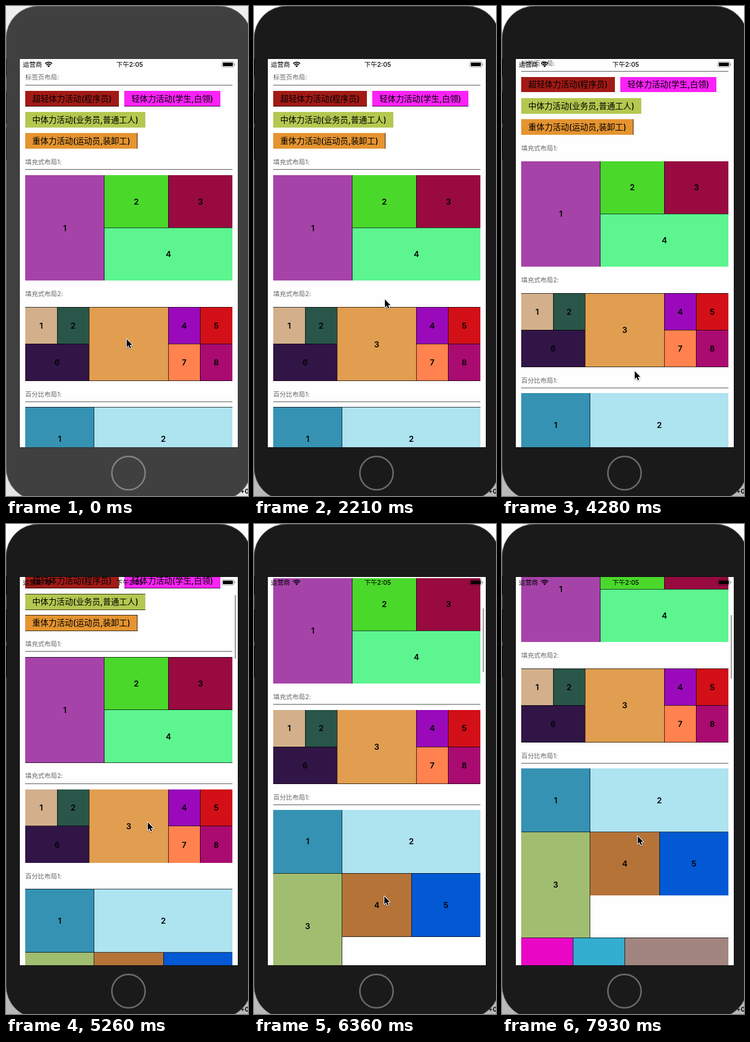
Animation, 403 px wide and 814 px high, one loop 8000 ms. Source, as an HTML page with a canvas:

```html
<!DOCTYPE html>
<html lang="zh-CN">
<head>
<meta charset="utf-8">
<style>
html, body { margin: 0; width: 100%; height: 100%; overflow: hidden; background: #eee; }
canvas { display: block; width: 403px; height: 814px; }
</style>
</head>
<body>
<canvas id="stage" width="403" height="814"></canvas>
<script>
const g = document.getElementById('stage').getContext('2d');
const LOOP = 8000;
const FONT = 'Inter, "Noto Sans CJK SC", "Noto Sans CJK", sans-serif';

const STEPS = [0, 600, 750, 1500, 2210, 2390, 2570, 2750, 2940, 3120, 3330, 3480, 3640, 3800,
  3960, 4120, 4280, 4430, 4600, 4760, 4930, 5100, 5260, 5440, 5620, 5800, 5980, 6160, 6360,
  6530, 6740, 6900, 7070, 7370, 7550, 7740, 7930];

// time, scroll offset, pointer x, pointer y
const KEYS = [
  [0, 0, 200, 552], [500, 0, 200, 552], [750, 0, 215, 486], [1500, 0, 217, 486],
  [2210, 0, 217, 486], [2750, 0, 219, 465], [3120, 14.6, 223, 440], [3330, 17.28, 223, 437],
  [3640, 22, 223, 445], [3960, 23.15, 221, 550], [4280, 23.15, 220, 605],
  [4600, 23.15, 223, 594], [4930, 25, 230, 535], [5260, 59.62, 235, 494],
  [5440, 95, 236, 462], [5620, 130, 234, 446], [5980, 174, 225, 530], [6360, 191.38, 216, 617],
  [6530, 194.4, 216, 617], [7070, 197, 219, 600], [7370, 200, 221, 580],
  [7550, 212, 222, 564], [7740, 244, 224, 534], [7930, 260.1, 225, 517]
];

const LABELS = [
  ['标签页布局:', 118, 131.25], ['填充式布局1:', 259, 271.05],
  ['填充式布局2:', 478, 490.8], ['百分比布局1:', 645, 657.45]
];

const L = 31.9, R = 377.2;
// left, top, right, bottom, colour, text
const TILES = [
  [L, 140.8, 188.2, 166.55, '#a21a15', '超轻体力活动(程序员)'],
  [196.9, 140.8, 357.2, 166.55, '#fa22f6', '轻体力活动(学生,白领)'],
  [L, 175.8, 232.2, 202.3, '#b4c850', '中体力活动(业务员,普通工人)'],
  [L, 210.8, 218.8, 237.3, '#e59430', '重体力活动(运动员,装卸工)'],

  [L, 280.9, 163.6, 456.4, '#a643a9', '1'],
  [163.6, 280.9, 270.2, 368.4, '#4ad92b', '2'],
  [270.2, 280.9, R, 368.4, '#980a40', '3'],
  [163.6, 368.4, R, 456.4, '#5cf58f', '4'],

  [L, 500.2, 85.2, 561.4, '#d3b08b', '1'],
  [85.2, 500.2, 138.3, 561.4, '#295649', '2'],
  [138.3, 500.2, 270.2, 622.95, '#e19e50', '3'],
  [270.2, 500.2, 323.2, 561.4, '#9a0abb', '4'],
  [323.2, 500.2, R, 561.4, '#d30f17', '5'],
  [L, 561.4, 138.3, 622.95, '#311546', '6'],
  [270.2, 561.4, 323.2, 622.95, '#ff824f', '7'],
  [323.2, 561.4, R, 622.95, '#a90b70', '8'],

  [L, 666.05, 146.6, 771.6, '#3592b3', '1'],
  [146.6, 666.05, R, 771.6, '#aee3f0', '2'],
  [L, 771.6, 146.6, 947.3, '#a1bd70', '3'],
  [146.6, 771.6, 262.2, 877.2, '#b57338', '4'],
  [262.2, 771.6, R, 877.2, '#0259d3', '5'],
  [L, 947.3, 118.2, 1053, '#e907c5', '6'],
  [118.2, 947.3, 204.4, 1053, '#33aed0', '7'],
  [204.4, 947.3, R, 1053, '#a38580', '8']
];

const round = Math.round;

function rect(x, y, w, h, color) {
  g.fillStyle = color;
  g.fillRect(x, y, w, h);
}

function text(s, x, y, size, color, weight = 400, align = 'left') {
  g.font = `${weight} ${size}px ${FONT}`;
  g.textAlign = align;
  g.fillStyle = color;
  g.fillText(s, x, y + size * 0.365);
}

// Half-pixel lines survive downscaling only at some positions
const shown = v => v - Math.floor(v) < 0.5;
function hairH(x, y, w, color) {
  if (shown(y)) rect(x, Math.floor(y), w, 1, color);
}
function hairV(x, y, h, color) {
  if (shown(x)) rect(Math.floor(x), y, 1, h, color);
}

function tile([x0, y0, x1, y1, color, label], off) {
  y0 -= off;
  y1 -= off;
  const x = round(x0), y = round(y0), w = round(x1) - x, h = round(y1) - y;
  const edge = 'rgba(0,0,0,.72)';
  rect(x, y, w, h, color);
  hairH(x, y0, w, edge);
  hairH(x, y1 - 0.5, w, edge);
  hairV(x0, y, h, edge);
  hairV(x1 - 0.5, y, h, edge);
  const weight = label.length > 1 ? 500 : 600;
  text(label, (x0 + x1) / 2, (y0 + y1) / 2, 13.55, '#000', weight, 'center');
}

function phone(active) {
  const back = g.createLinearGradient(0, 0, 0, 814);
  back.addColorStop(0, active ? '#fff' : '#eee');
  back.addColorStop(1, active ? '#b8b8b8' : '#e4e4e4');
  rect(0, 0, 403, 814, back);
  text('+0', 390, 806, 11, '#111', 700);

  g.beginPath();
  g.roundRect(0, 0, 409, 821, 54);
  g.fillStyle = active ? '#1a1a1a' : '#404040';
  g.fill();
  g.strokeStyle = active ? '#777' : '#8a8a8a';
  g.lineWidth = 1;
  g.stroke();
  for (const [y, h] of [[87, 30], [142, 53], [202, 53]])
    rect(0, y, 1.5, h, active ? '#0c0c0c' : '#2c2c2c');

  g.beginPath();
  g.arc(204, 776, 27.7, 0, 7);
  g.strokeStyle = active ? '#6b6b6b' : '#828282';
  g.lineWidth = 2.5;
  g.stroke();
  rect(22, 87, 365, 647, active ? '#111' : '#333');
  rect(23, 88, 363, 645, '#fefefe');
}

function statusBar() {
  text('运营商', 28, 97, 10.65, '#000');
  text('下午2:05', 206, 97, 10.65, '#000', 500, 'center');
  g.strokeStyle = g.fillStyle = '#000';
  g.lineWidth = 1.7;
  for (const r of [8.2, 5.2]) {
    g.beginPath();
    g.arc(71, 101.5, r, -Math.PI * 0.75, -Math.PI * 0.25);
    g.stroke();
  }
  g.beginPath();
  g.moveTo(71, 101.8);
  g.arc(71, 101.8, 3.2, -Math.PI * 0.75, -Math.PI * 0.25);
  g.fill();

  g.lineWidth = 0.8;
  g.strokeStyle = 'rgba(0,0,0,.45)';
  g.beginPath();
  g.roundRect(359.4, 92.4, 20, 9.2, 2.3);
  g.stroke();
  g.fillStyle = '#000';
  g.beginPath();
  g.roundRect(361, 94, 16.8, 6, 1);
  g.fill();
  rect(380.3, 95.5, 1.2, 3, 'rgba(0,0,0,.45)');
}

function pointer(x, y) {
  g.save();
  g.translate(x, y);
  g.shadowColor = 'rgba(0,0,0,.35)';
  g.shadowBlur = 2;
  g.shadowOffsetY = 1;
  g.lineWidth = 2;
  g.lineJoin = 'round';
  g.strokeStyle = '#fff';
  g.fillStyle = '#000';
  const p = new Path2D('M1 1.5V14.5L4 11.7L6.2 16.6L8.3 15.7L6.2 10.9H10.3Z');
  g.stroke(p);
  g.shadowColor = 'transparent';
  g.fill(p);
  g.restore();
}

function pose(t) {
  const i = KEYS.findLastIndex(k => k[0] <= t);
  const a = KEYS[i], b = KEYS[i + 1] || a;
  const u = b === a ? 0 : (t - a[0]) / (b[0] - a[0]);
  return a.slice(1).map((v, j) => v + (b[j + 1] - v) * u);
}

function draw(now) {
  const time = now % LOOP;
  const t = STEPS.findLast(s => s <= time);
  const [off, px, py] = pose(t);
  phone(t >= 2210);

  g.save();
  g.beginPath();
  g.rect(23, 88, 363, 645);
  g.clip();
  for (const [s, y, line] of LABELS) {
    text(s, 32, y - off, 10.65, '#666');
    hairH(32, line - off, 345, '#5c5c5c');
  }
  for (const item of TILES) tile(item, off);
  if (t >= 2940 && t < 3960 || t >= 4930 && t < 6900 || t >= 7370) {
    g.fillStyle = 'rgba(0,0,0,.36)';
    g.beginPath();
    g.roundRect(380.8, 110.8 - 2.8 + off / 6, 2.3, 106, 1.1);
    g.fill();
  }
  statusBar();
  g.restore();

  pointer(round(px), round(py));
  requestAnimationFrame(draw);
}
requestAnimationFrame(draw);
</script>
</body>
</html>
```
